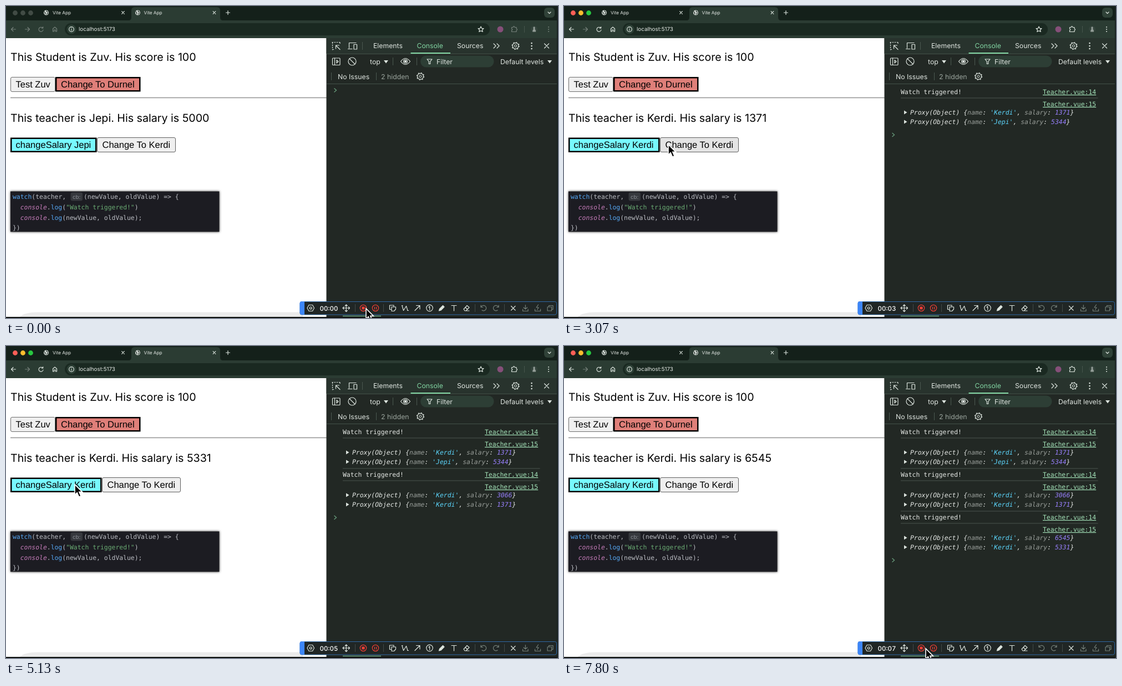
These frames come from a looping animation (995 px wide and 563 px high, 7880 ms). An HTML page:

```html
<!DOCTYPE html>
<html lang="en">
<head>
<meta charset="utf-8">
<title>Watching a reactive object</title>
<style>
  html, body { margin: 0; width: 100%; height: 100%; overflow: hidden; background: #fff; }
  svg { display: block; width: 100%; height: 100%; }
  text { white-space: pre; text-rendering: geometricPrecision; font-family: Inter, sans-serif; }
  .body { font-size: 19.65px; fill: #000; }
  .button { font: 16.5px "Liberation Sans", Arial, sans-serif; fill: #000; }
  .tab { font-size: 8.2px; fill: #e3e8e4; }
  .tool { font-size: 12.25px; fill: #dfe5e0; }
  .mono { font: 11.42px "DejaVu Sans Mono", monospace; fill: #e6e9e6; }
  .code { fill: #bcbec4; }
  .italic { font-style: italic; }
  .link { fill: #a5e4ba; text-decoration: underline; }
  .key { fill: #989d99; } .string { fill: #5cd5fb; } .number { fill: #9980ff; }
  .icon { fill: none; stroke: #dce4de; stroke-width: 1.2; stroke-linejoin: round; stroke-linecap: round; }
  .dim { stroke: #75807a; }
  .red { stroke: #ef3f36; }
</style>
</head>
<body>
<svg viewBox="0 0 995 563" preserveAspectRatio="none">
  <defs>
    <filter id="shadow" x="-5%" y="-20%" width="110%" height="140%">
      <feDropShadow dx="0" dy="0" stdDeviation="2" flood-color="#000" flood-opacity=".75"/>
    </filter>
    <g id="globe">
      <circle r="4.5" fill="#d9dfdb"/>
      <path d="M-3.5-2Q-1 0-2 3M1-4Q0-1 3.6-1M1 3.6Q1 1 3.5 1.5" fill="none" stroke="#27352d" stroke-width="1.3"/>
    </g>
    <path id="close" d="M-2.3-2.3 2.3 2.3M2.3-2.3-2.3 2.3"/>
    <g id="gear" fill="none">
      <circle r="5.4" stroke-width="1.2"/><circle r="2.1"/>
      <circle r="6.5" stroke-width="1.2" stroke-dasharray="2.2 2.905"/>
    </g>
  </defs>

  <!-- Browser frame -->
  <rect width="995" height="30" fill="#14201a"/>
  <rect y="26" width="995" height="32" fill="#2b3c33"/>
  <path d="M221 26Q226 26 226 20V8Q226 2 232 2H380Q386 2 386 8V20Q386 26 391 26Z" fill="#2b3c33"/>
  <g id="lights"><circle cx="16.500" cy="12.500" r="4.400"/><circle cx="30.500" cy="12.500" r="4.400"/><circle cx="44.500" cy="12.500" r="4.400"/></g>
  <use href="#globe" x="72.500" y="12"/><use href="#globe" x="237.500" y="12"/>
  <text class="tab" x="84" y="15">Vite App</text>
  <text class="tab" x="248.500" y="15">Vite App</text>
  <g class="icon">
    <use href="#close" x="211" y="12"/><use href="#close" x="375.500" y="12"/>
    <path d="M396.500 12H403.500M400 8.500V15.500"/>
  </g>
  <rect x="970" y="3" width="19" height="18" rx="6" fill="#2f4137"/>
  <path class="icon" d="M977 11 979.500 13.500 982 11"/>
  <rect x="106" y="31" width="766" height="22" rx="11" fill="#1a2921"/>
  <circle cx="118" cy="42" r="8.500" fill="#2c3f35"/>
  <g class="icon">
    <circle cx="118" cy="42" r="4.300"/><path d="M118 41.800V44M118 39.700V39.800"/>
    <path d="M856 37 857.500 40.300 861 40.600 858.400 43 859.200 46.500 856 44.700 852.800 46.500 853.600 43 851 40.600 854.500 40.300Z"/>
  </g>
  <text x="131" y="45.300" font-size="9.800" fill="#e6ebe7">localhost:5173</text>
  <g class="icon" id="nav">
    <path d="M17.500 42H10M13 38.500 9.500 42 13 45.500"/>
    <path d="M66 39.500A4 4 0 1 0 67 43M66.700 37.500V40H64"/>
    <path d="M84.500 46V41L88 38 91.500 41V46H89.300V43H86.700V46Z"/>
    <path d="M911.500 38.500H914Q915.500 34.500 917 38.500H920V41Q923 42.500 920 44V46.500H911.500V44Q914 42.500 911.500 41Z"/>
    <path d="M978 38V38.100M978 42V42.100M978 46V46.100" stroke-width="2"/>
  </g>
  <path class="icon dim" d="M34.500 42H42M39 38.500 42.500 42 39 45.500"/>
  <circle cx="891" cy="42" r="5.500" fill="#854f79"/>
  <path d="M934.500 36V48" stroke="#46564c"/>
  <circle cx="952" cy="42" r="6" fill="#34443c"/>
  <path d="M949 46.500Q949.300 42.500 951 41.500A1.700 2.200 0 1 1 953 41.500Q955 42.500 955 46.500Z" fill="#949e98"/>

  <!-- Page -->
  <rect y="58" width="578" height="503" fill="#fff"/>
  <text class="body" x="8" y="99">This Student is Zuv. His score is 100</text>
  <rect x="8.500" y="128.500" width="80" height="26" rx="2.500" fill="#efefef" stroke="#6d6d6d"/>
  <text class="button" x="17.500" y="147">Test Zuv</text>
  <rect x="89" y="128" width="153.500" height="26.500"/>
  <rect x="91.500" y="130.500" width="148.500" height="21.500" fill="#df7f79"/>
  <text class="button" x="99" y="147">Change To Durnel</text>
  <path d="M8 165.500H578" stroke="#929292" stroke-width="1.500"/>
  <text class="body" id="sentence" x="8" y="208.500"></text>
  <rect id="salaryFrame" x="8" y="237.500" height="26.500"/>
  <rect id="salaryFace" y="240" height="21.500" fill="#77f8fd"/>
  <text class="button" id="salaryLabel" x="17.500" y="256"></text>
  <g id="change">
    <rect id="changeFace" x=".5" y="237.500" width="141" height="26" rx="2.500" stroke="#5f5f5f"/>
    <text class="button" x="9.500" y="256">Change To Kerdi</text>
  </g>
  <rect x="8" y="334.500" width="376.500" height="73" fill="#1e1f24" filter="url(#shadow)"/>
  <rect x="116.500" y="336.500" width="21.500" height="15" rx="3" fill="#36383d"/>
  <text x="120" y="347.500" font-size="9.800" fill="#8b8f96">cb:</text>
  <text class="mono code" x="12" y="348"><tspan fill="#56a8f5">watch</tspan>(teacher,</text>
  <text class="mono code" x="140" y="348">(newValue, oldValue) =&gt; {</text>
  <text class="mono code" x="25.700" y="367"><tspan class="italic" fill="#c77dbb">console</tspan>.<tspan fill="#56a8f5">log</tspan>(<tspan fill="#6aab73">"Watch triggered!"</tspan>)</text>
  <text class="mono code" x="25.700" y="385.500"><tspan class="italic" fill="#c77dbb">console</tspan>.<tspan fill="#56a8f5">log</tspan>(newValue, oldValue);</text>
  <text class="mono code" x="12" y="404">})</text>
  <path d="M25 561Q33 552.500 58 552.500H535V561Z" fill="#ebebeb"/>

  <!-- Developer tools -->
  <rect x="577.500" y="58" width="417.500" height="505" fill="#222824"/>
  <rect x="577.500" y="58" width="417.500" height="28" fill="#28332d"/>
  <path d="M578 86.500H993M578 140.500H993" stroke="#435149"/>
  <path d="M729.500 85H801" stroke="#82d5a2" stroke-width="2"/>
  <path d="M642.500 65V79M697.500 93V107M740.500 93V107M586.500 120V134M667.500 120V134" stroke="#4b5850"/>
  <rect x="747" y="89.500" width="132.500" height="21" rx="10.500" fill="#2d3e35"/>
  <g class="tool">
    <text x="662" y="76.300">Elements</text>
    <text x="740.500" y="76.300" fill="#82d5a2">Console</text>
    <text x="813" y="76.300">Sources</text>
    <text x="656" y="104.500">top</text>
    <text x="776" y="104.500">Filter</text>
    <text x="891" y="104.500">Default levels</text>
    <text x="598" y="131.500">No Issues</text>
    <text x="676" y="131.500" fill="#9aa49d">2 hidden</text>
  </g>
  <g fill="#dce4de"><path d="M681 98H689L685 103.500ZM976 98H984L980 103.500Z"/><circle cx="720" cy="100" r="2.300"/></g>
  <g class="icon">
    <path d="M588 65.500H602M588.500 66V79M602 66V70M589 78.500H593" stroke-dasharray="1.500 2.600"/>
    <path d="M602 78.500 595 71.500M594.500 77V71H600.500"/>
    <path d="M618.500 76V66.500H631M616.500 77.500H624M627 69.500H632.500V78H627Z"/>
    <path d="M879 68 883 72 879 76M885 68 889 72 885 76"/>
    <path d="M970.500 68 978.500 76M978.500 68 970.500 76"/>
    <path d="M947.500 67V67.100M947.500 72V72.100M947.500 77V77.100" stroke-width="2.600"/>
    <rect x="588.500" y="94" width="13.500" height="12.500" rx="1"/><path d="M592.500 94V106.500M596 97.500 599 100.200 596 103Z"/>
    <circle cx="624" cy="100" r="7"/><path d="M619 95 629 105"/>
    <path d="M711.500 100Q720 89 728.500 100Q720 111 711.500 100Z"/><circle cx="720" cy="100" r="3.500"/>
    <path d="M759 96H768L764.700 100.200V104.500H762.300V100.200Z"/>
  </g>
  <g stroke="#dce4de"><use href="#gear" x="918.500" y="72"/><use href="#gear" x="747" y="127"/></g>
  <g id="log"></g>
  <path id="prompt" d="M591.500-3.500 595.500 0 591.500 3.500" fill="none" stroke="#689c7c" stroke-width="1.300"/>

  <!-- Window edges and recording bar -->
  <path d="M0 562H995" stroke="#0c0f0e" stroke-width="2"/>
  <path d="M994 0V563" stroke="#17201f" stroke-width="2"/>
  <rect x="530" y="533.500" width="462.500" height="23.500" rx="3" fill="#202625" stroke="#2f69a5"/>
  <path d="M607 559.500H676" stroke="#6ba684" stroke-width="1.500"/>
  <path d="M538 533H533Q529.500 533 529.500 537V553Q529.500 557 533 557H538Z" fill="#3d86f7"/>
  <path d="M629.500 538V552M680.500 538V552M845.500 538V552M898.500 538V552" stroke="#434a48"/>
  <text id="timer" x="565.500" y="549.500" font-size="11.500" font-weight="500" fill="#fff" style="font-variant-numeric:tabular-nums"></text>
  <g class="icon">
    <path d="M546 539.500H552.500L555.500 545 552.500 550.500H546L543 545Z"/><circle cx="549.300" cy="545" r="2"/>
    <path d="M607 545H619.500M613.300 539V551.500M609 543 607 545 609 547M617.500 543 619.500 545 617.500 547M611.300 541 613.300 539 615.300 541M611.300 549.500 613.300 551.500 615.300 549.500"/>
    <path d="M695 547.500H691.500V540H699V542.500M695 543H702.500V547L699.500 550.500H695Z"/>
    <path d="M714 541 716.500 549.500 721.500 541.500 724 549.500M713.500 540.500H715M723.500 549.500H725.500"/>
    <path d="M737 549.500 746 540.500M739.500 540.500H746V547"/>
    <circle cx="763.500" cy="545" r="5.800"/><path d="M762 543.500 763.700 542V548.200"/>
    <path d="M780.500 550 781.500 546.500 787.500 540.500 790 543 784 549Z" fill="#dce4de"/>
    <path d="M803 540.500H812M807.500 540.500V550"/>
    <path d="M825 547 831 540.500 835 544 829 550H827ZM828 544 832 547.500M829 550H835"/>
    <path d="M910.500 541.500 918 549M918 541.500 910.500 549"/>
  </g>
  <g class="icon red">
    <circle cx="644" cy="545" r="5.700"/><rect x="642" y="543" width="4" height="4" fill="#ef3f36"/>
    <circle cx="666" cy="545" r="5.700"/><path d="M664.500 543V547.200M667.700 543V547.200"/>
  </g>
  <g class="icon dim">
    <path d="M856 540V543.500H859.500M856.500 543A4.800 4.800 0 1 1 858 549"/>
    <path d="M888 540V543.500H884.500M887.500 543A4.800 4.800 0 1 0 886 549"/>
    <path d="M936.300 539.500V547M933 544 936.300 547 939.500 544M931.500 547V550.500H941V547"/>
    <path d="M959.500 539 956 544H960L957.500 548M953.500 547V550.500H963.500V547"/>
    <path d="M976 543H983.500V550H976ZM978.500 543V540.500H986V547.500H983.500"/>
  </g>
  <path id="cursor" d="M0 0V18.500L4.200 14.600 7.500 22.300 11 20.800 7.800 13.400H13.500Z" fill="#000" stroke="#fff" stroke-width="1.600"/>
</svg>
<script>
  const LOOP = 7880;
  const FOCUS_AT = 1000;
  const NAMES = { first: "Jepi", second: "Kerdi" };
  const SWAP_AT = 2820;

  const salaries = [[0, 5000], [1990, 5344], [SWAP_AT, 1371], [3250, 3066], [3950, 1699], [4800, 5331], [5610, 6545]];
  const salaryPresses = [FOCUS_AT, 1990, 3950, 4800];
  const path = [
    [0, 649, 546], [100, 649, 546], [810, 134, 250], [2150, 134, 250], [2500, 188, 250],
    [3330, 188, 250], [3650, 148, 250], [4050, 148, 250], [4400, 124, 250], [5200, 124, 250],
    [5560, 232, 250], [6100, 232, 250], [6850, 735, 494], [7400, 652, 546], [LOOP, 652, 546],
  ];
  const entries = [
    { at: SWAP_AT, values: [[NAMES.second, 1371], [NAMES.first, 5344]] },
    { at: 3250, values: [[NAMES.second, 3066], [NAMES.second, 1371]] },
    { at: 5610, values: [[NAMES.second, 6545], [NAMES.second, 5331]] },
  ];

  const el = id => document.getElementById(id);
  const set = (id, attributes) => {
    for (const [key, value] of Object.entries(attributes)) el(id).setAttribute(key, value);
  };

  const proxyRow = ([name, salary], y) =>
    `<path d="M613 ${y - 7.5}V${y - .5}L618.500 ${y - 4}Z" fill="#dce4de"/>
    <text class="mono italic" x="624" y="${y}">Proxy(Object) {<tspan class="key">name</tspan>: <tspan class="string">'${name}'</tspan>, <tspan class="key">salary</tspan>: <tspan class="number">${salary}</tspan>}</text>`;

  const entryMarkup = ({ values }, i) => {
    const y = 159 + 77 * i;
    const divider = `M607 ${y + 7}H962.500` + (i ? `M607 ${y - 15}H962.500` : "");
    return `<g><path d="${divider}" stroke="#4b554f"/>
      <text class="mono" x="607" y="${y}">Watch triggered!</text>
      <text class="mono link" x="863" y="${y}">Teacher.vue:14</text>
      <text class="mono link" x="863" y="${y + 22}">Teacher.vue:15</text>
      ${proxyRow(values[0], y + 37)}${proxyRow(values[1], y + 54)}</g>`;
  };
  el("log").innerHTML = entries.map(entryMarkup).join("");

  function cursorAt(t) {
    const next = path.findIndex(point => point[0] > t);
    const [t0, x0, y0] = path[next - 1], [t1, x1, y1] = path[next];
    const u = (t - t0) / (t1 - t0), eased = u * u * (3 - 2 * u);
    return [x0 + (x1 - x0) * eased, y0 + (y1 - y0) * eased];
  }

  function draw(t) {
    const [x, y] = cursorAt(t);
    const name = t < SWAP_AT ? NAMES.first : NAMES.second;
    const salary = salaries.findLast(([at]) => at <= t)[1];
    const salaryEnd = t < SWAP_AT ? 163.5 : 172.5;
    const pressed = salaryPresses.some(at => t >= at - 90 && t < at);
    const hovered = y < 264 && x > salaryEnd && x < salaryEnd + 142;
    const focused = t >= FOCUS_AT;

    set("cursor", { transform: `translate(${x} ${y})` });
    el("sentence").textContent = `This teacher is ${name}. His salary is ${salary}`;
    el("salaryLabel").textContent = `changeSalary ${name}`;
    set("salaryFrame", { width: salaryEnd - 8 });
    set("salaryFace", { x: pressed ? 11 : 10.5, width: salaryEnd - 13 });
    set("change", { transform: `translate(${salaryEnd + .5} 0)` });
    set("changeFace", { fill: hovered ? "#e4e4e4" : "#efefef" });

    const colors = focused ? ["#fe5f57", "#febc2e", "#28c840"] : Array(3).fill("#414b45");
    [...el("lights").children].forEach((light, i) => light.setAttribute("fill", colors[i]));
    set("nav", { class: focused ? "icon" : "icon dim" });

    const shown = entries.filter(({ at }) => at <= t).length;
    [...el("log").children].forEach((row, i) => row.setAttribute("display", i < shown ? "inline" : "none"));
    set("prompt", { transform: `translate(0 ${shown ? 155.5 + 77 * shown : 152})` });
    el("timer").textContent = `00:0${Math.floor(t / 1000)}`;
  }

  const start = performance.now();
  function tick() {
    draw((performance.now() - start) % LOOP);
    requestAnimationFrame(tick);
  }
  tick();
</script>
</body>
</html>
```
